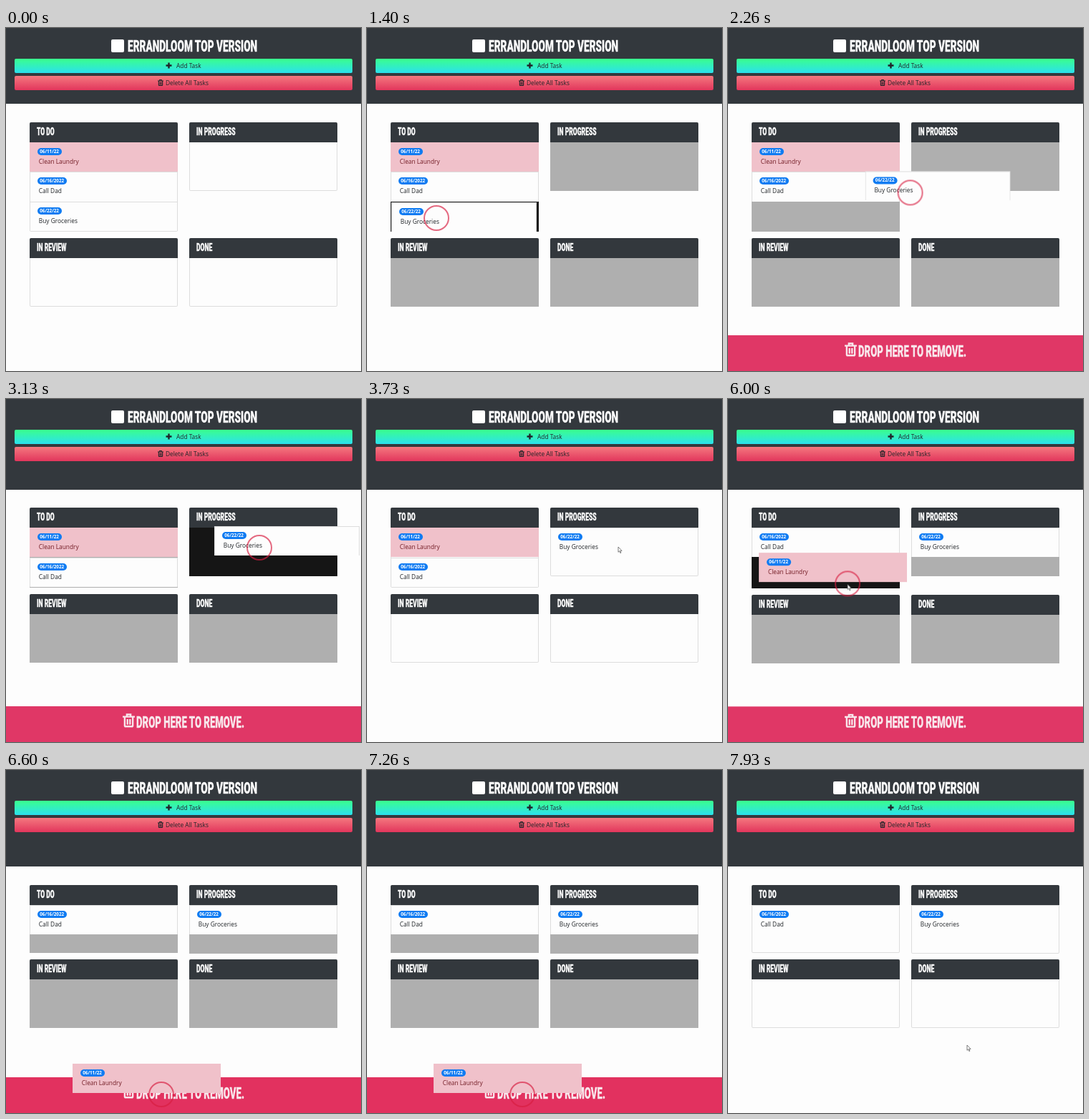
These frames come from a looping animation (496 px wide and 480 px high, 8000 ms). An HTML page:

```html
<!DOCTYPE html>
<html lang="en">
<head>
<meta charset="utf-8">
<title>Task board</title>
<style>
html, body { margin: 0; width: 100%; height: 100%; overflow: hidden; background: #fdfdfd; }

/* --c is the height of the first card; the whole page is laid out from it */
.stage {
  --c: 153.5px;
  --bin: #e03766;
  --top: calc(208.3px - var(--c) / 2);
  --dark: #33383d;
  --line: #00000020;
  position: relative; width: 496px; height: 480px; overflow: hidden;
  background: #fdfdfd; color: #212529;
  font: 8.36px/12px 'Open Sans', 'Noto Sans', sans-serif;
  animation: layout 8s step-end infinite;
}
.stage * { position: absolute; box-sizing: border-box; white-space: nowrap; }
svg { overflow: visible; }

.display {
  font-family: Roboto, 'Open Sans', sans-serif; font-weight: 900; color: #fff;
  -webkit-text-stroke: .3px currentColor;
  transform: scaleX(.62); transform-origin: 0 50%;
}
.head { left: 0; top: 0; width: 496px; height: calc(183px - var(--c) / 2); background: var(--dark); }
.mark { left: 147px; top: 16px; width: 18px; height: 18px; border-radius: 2px; background: #fff; }
.title { left: 170px; top: 11px; font-size: 22px; line-height: 30px; }

.button { left: 12px; width: 472px; height: 20px; border-radius: 2px; }
.button span { top: 4px; }
.add { top: 43px; background: linear-gradient(#3aff8c, #2be0ee); }
.delete { top: 67px; background: linear-gradient(#f4787f, #e2365c); }

.card {
  left: 33px; top: var(--top); width: 207px; height: 96px;
  border-radius: 2px; box-shadow: inset 0 0 0 1px var(--line);
}
.card.right { left: 256px; }
.card.low { top: calc(var(--top) + var(--c) + 8.7px); }
.card.todo { height: var(--c); }
.card h2 {
  margin: 0; left: 0; top: 0; width: 100%; height: 28px;
  background: var(--dark); border-radius: 2px 2px 0 0;
}
.card h2 span { left: 10px; top: 3px; font-size: 13.8px; line-height: 21px; }
.list { left: 0; right: 0; top: 28px; bottom: 0; animation: target 8s step-end infinite; }
.todo .list { animation-name: todo-target; }
.progress .list { animation-name: progress-target; }

.task {
  left: 0; top: 0; width: 207px; height: 41.5px;
  background: #fdfdfd; border: 1px solid var(--line); border-bottom: 0;
}
.task b {
  left: 9.5px; top: 7px; height: 10px; padding: 0 3.75px; border-radius: 5px;
  background: #0f7bf2; color: #fff; font-size: 6.27px; line-height: 10px;
}
.task span { left: 11.8px; top: 20px; }
.late { background: #f0c1ca; color: #721c24; border-color: #f0c1ca; }
.clean { animation: clean 8s step-end infinite; }
.call { animation: call 8s step-end infinite; }
.buy { top: 83px; animation: buy 8s step-end infinite; }
.bought { animation: bought 8s step-end infinite; }

.bin {
  left: 0; top: 430px; width: 496px; height: 50px; background: var(--bin);
  animation: bin 8s ease infinite;
}
.bin * { color: #f8e6eb; }
.bin .display { left: 182px; top: 8px; font-size: 21.3px; line-height: 30px; }

.pointer { left: 0; top: 0; width: 0; height: 0; animation: pointer 8s ease-in-out infinite; }
.held-buy { left: -63px; width: 203px; animation: held-buy 8s step-end infinite; }
.held-clean { left: -124px; animation: held-clean 8s step-end infinite; }
.ring {
  left: -18px; top: -19px; width: 36px; height: 36px; border-radius: 50%;
  border: 2px solid #d81e40a8; animation: ring 8s step-end infinite;
}
.cursor { left: 0; top: 0; animation: cursor 8s step-end infinite; }

@keyframes layout {
  0% { --c: 153.5px; --bin: #e03766; }
  28.5% { --c: 112px; --bin: #e03766; }
  70.5% { --c: 113px; --bin: #e03766; }
  81%, 100% { --c: 95.5px; --bin: #e2315f; }
}
@keyframes target {
  0%, 39.5%, 93.4%, 100% { background-color: transparent; }
  17.1%, 70.5% { background-color: #afafaf; }
}
@keyframes todo-target {
  0%, 39.5%, 93.4%, 100% { background-color: transparent; }
  17.1%, 70.5% { background-color: #151515; }
  27.25%, 75.25% { background-color: #afafaf; }
}
@keyframes progress-target {
  0%, 39.5%, 93.4%, 100% { background-color: transparent; }
  17.1%, 70.5% { background-color: #afafaf; }
  28.5% { background-color: #151515; }
}
@keyframes clean { 0% { opacity: 1; } 70.5%, 100% { opacity: 0; } }
@keyframes call { 0% { top: 41.5px; } 73.5%, 100% { top: 0; } }
@keyframes buy { 0% { opacity: 1; } 17.1%, 100% { opacity: 0; } }
@keyframes bought { 0% { opacity: 0; } 39.5%, 100% { opacity: 1; } }
@keyframes bin {
  0%, 17.6%, 43.2%, 71%, 97.1%, 100% { transform: translateY(50px); }
  21.4%, 39.5%, 75.5%, 93.4% { transform: none; }
}
@keyframes pointer {
  0%, 6% { transform: translate(-20px, 210px); }
  15%, 17.5% { transform: translate(97px, 267px); }
  36.5%, 39.5% { transform: translate(354px, 209px); }
  42%, 61% { transform: translate(351px, 207px); }
  69.5%, 70.6% { transform: translate(157px, 216px); animation-timing-function: ease-in; }
  75% { transform: translate(167px, 259px); animation-timing-function: linear; }
  80.6% { transform: translate(210px, 425px); animation-timing-function: ease-out; }
  82.5%, 93.4% { transform: translate(217px, 455px); }
  98%, 100% { transform: translate(334px, 385px); }
}
@keyframes held-buy {
  0%, 39.5%, 100% { opacity: 0; top: -31.5px; }
  17.1% { opacity: 1; top: -23px; }
  18% { opacity: 1; top: -31.5px; }
}
@keyframes held-clean {
  0%, 93.4%, 100% { opacity: 0; top: -44.5px; }
  70.5% { opacity: 1; top: -36px; }
  71.5% { opacity: 1; top: -44.5px; }
}
@keyframes ring {
  0%, 39.5%, 93.4%, 100% { opacity: 0; }
  17%, 70.5% { opacity: 1; }
}
@keyframes cursor {
  0%, 39.5%, 93.4%, 100% { opacity: 1; }
  17%, 77% { opacity: 0; }
  70.5% { opacity: 1; }
}
</style>
</head>
<body>
<div class="stage">
  <svg width="0" height="0">
    <symbol id="trash" viewBox="0 0 16 18">
      <path d="M0 4h16M5.500 3.500V1h5v2.500M2.700 5v10.500q0 1.300 1.300 1.300h8q1.300 0 1.300-1.300V5M6.300 7v7.500M9.700 7v7.500"
        fill="none" stroke="currentColor" stroke-width="2.200"/>
    </symbol>
  </svg>

  <div class="head">
    <div class="mark"></div>
    <div class="display title">ERRANDLOOM TOP VERSION</div>
    <div class="button add">
      <svg style="left:211px;top:5px" width="9" height="9"><path d="M4.500 .5v8M.5 4.500h8" stroke="#212529" stroke-width="2.400"/></svg>
      <span style="left:226px">Add Task</span>
    </div>
    <div class="button delete">
      <svg style="left:200px;top:5px" width="8" height="9"><use href="#trash"/></svg>
      <span style="left:211px">Delete All Tasks</span>
    </div>
  </div>

  <div class="card todo">
    <h2><span class="display">TO DO</span></h2>
    <div class="list">
      <div class="task call"><b>06/16/2022</b><span>Call Dad</span></div>
      <div class="task late clean"><b>06/11/22</b><span>Clean Laundry</span></div>
      <div class="task buy"><b>06/22/22</b><span>Buy Groceries</span></div>
    </div>
  </div>
  <div class="card right progress">
    <h2><span class="display">IN PROGRESS</span></h2>
    <div class="list">
      <div class="task bought"><b>06/22/22</b><span>Buy Groceries</span></div>
    </div>
  </div>
  <div class="card low">
    <h2><span class="display">IN REVIEW</span></h2>
    <div class="list"></div>
  </div>
  <div class="card right low">
    <h2><span class="display">DONE</span></h2>
    <div class="list"></div>
  </div>

  <div class="bin">
    <svg style="left:163px;top:10px" width="17" height="20"><use href="#trash"/></svg>
    <div class="display">DROP HERE TO REMOVE.</div>
  </div>

  <div class="pointer">
    <div class="task held-buy"><b>06/22/22</b><span>Buy Groceries</span></div>
    <div class="task late held-clean"><b>06/11/22</b><span>Clean Laundry</span></div>
    <div class="ring"></div>
    <svg class="cursor" width="6" height="10">
      <path d="M0 0v7.300l1.700-1.500 1.200 2.800 1.100-.5-1.200-2.700h2.300z" fill="#fff" stroke="#4a4a4a" stroke-width=".7"/>
    </svg>
  </div>
</div>
</body>
</html>
```
